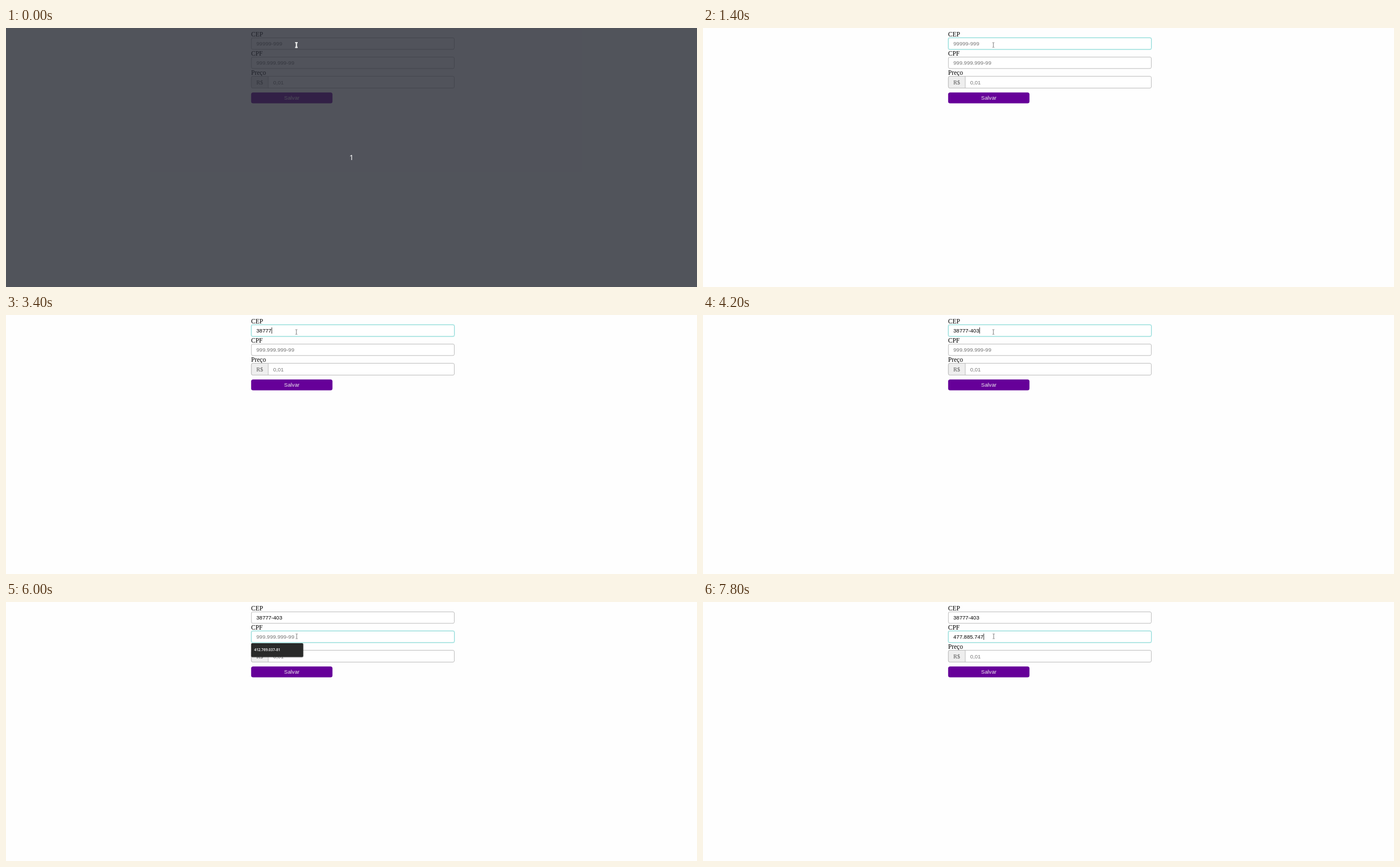
Write an HTML page that moves like this. It is 1220x459 px and loops after 8000 ms.

```html
<!DOCTYPE html>
<html lang="pt-BR">
<head>
<meta charset="utf-8">
<title>Formulário</title>
<style>
  html, body { margin: 0; width: 100%; height: 100%; overflow: hidden; background: #fefefe; }
  svg { display: block; width: 1220px; height: 459px; }
  text { white-space: pre; }
  .label { font: 11.48px "Liberation Serif", serif; fill: #000; }
  .field { font: 9.57px "Liberation Sans", sans-serif; fill: #000; }
  .field.hint { fill: #757575; }
  .prefix { font: 10.05px "Liberation Serif", serif; fill: #555; }
  .save { font: 9.57px "Liberation Sans", sans-serif; fill: #eee; text-anchor: middle; }
  .box { fill: #fff; stroke: #bdbdbd; stroke-width: 1; }
  .box.focus { stroke: #92dcd9; }
  .glow { fill: none; stroke: #a5e4e2; stroke-width: 2.4; opacity: .55; }
  .suggestion { font: 600 6.4px "Noto Sans", sans-serif; fill: #ddd; }
  .count { font: 13px "Noto Sans", sans-serif; fill: #fff; text-anchor: middle; }
</style>
</head>
<body>
<svg viewBox="0 0 1220 459">
  <rect width="1220" height="459" fill="#fefefe"/>

  <text class="label" x="432.8" y="14.8">CEP</text>
  <rect class="glow" id="cepGlow" x="433.3" y="17.5" width="358.2" height="20.3" rx="2.5"/>
  <rect class="box" id="cepBox" x="433.3" y="17.5" width="358.2" height="20.3" rx="2.5"/>
  <text class="field" id="cepText" x="442" y="31.3"></text>

  <text class="label" x="432.8" y="48.8">CPF</text>
  <rect class="glow" id="cpfGlow" x="433.3" y="51.5" width="358.2" height="20.3" rx="2.5"/>
  <rect class="box" id="cpfBox" x="433.3" y="51.5" width="358.2" height="20.3" rx="2.5"/>
  <text class="field" id="cpfText" x="442" y="65.3"></text>

  <text class="label" x="432.8" y="82.7">Preço</text>
  <rect class="box" x="433.3" y="85.6" width="358.2" height="20.9" rx="2.5"/>
  <path d="M463 85.6H435.8a2.5 2.5 0 0 0-2.5 2.5v15.9a2.5 2.5 0 0 0 2.5 2.5H463z" fill="#eee" stroke="#bdbdbd"/>
  <text class="prefix" x="442" y="99.8">R$</text>
  <text class="field hint" x="471.8" y="99.8">0,01</text>

  <rect x="432.8" y="114.2" width="143.6" height="19.2" rx="3.5" fill="#609"/>
  <text class="save" x="504.6" y="127.3">Salvar</text>

  <rect id="caret" width=".8" height="11"/>

  <g id="menu">
    <rect x="432.4" y="73" width="93" height="25.4" rx="2.4" opacity=".25"/>
    <rect x="432.9" y="72.9" width="91.8" height="24.6" rx="2" fill="#292a29"/>
    <text class="suggestion" x="438.3" y="87.3">412.769.037-81</text>
  </g>

  <g id="veil">
    <rect width="1220" height="459" fill="#262932" fill-opacity=".8"/>
    <text class="count" x="610" y="234">1</text>
  </g>

  <g id="pointer" fill="none">
    <path id="beam" d="M-2-4.2H-.6L0-3.7 .6-4.2H2M0-3.7V3.7M-2 4.2H-.6L0 3.7 .6 4.2H2" stroke="#fff" stroke-width="1.8"/>
    <use href="#beam" id="core"/>
    <path d="M-1.7-4.2H-.6L0-3.7 .6-4.2H1.7M0-3.7V3.7M-1.7 4.2H-.6L0 3.7 .6 4.2H1.7" stroke="#555" stroke-width=".75" id="ink"/>
  </g>
</svg>
<script>
const LOOP = 8000;
const $ = id => document.getElementById(id);

// keys: [time, characters shown]; caret: [on, off] spans
const fields = [
  {
    id: "cep", hint: "99999-999", value: "38777-403", top: 22, focus: [800, 5400],
    keys: [[2500, 1], [2700, 2], [2900, 3], [3200, 4], [3400, 5], [3600, 6], [3700, 7], [4000, 8], [4200, 9]],
    caret: [[800, 1400], [2000, 4700], [5200, 5400]]
  },
  {
    id: "cpf", hint: "999.999.999-99", value: "477.885.747", top: 56, focus: [5400, LOOP],
    keys: [[6300, 1], [6500, 2], [6800, 3], [7000, 4], [7100, 5], [7200, 6], [7300, 7], [7600, 10], [7800, 11]],
    caret: [[5400, 6000], [6300, LOOP]]
  }
];

const within = (t, [from, to]) => t >= from && t < to;
const clamp = v => Math.max(0, Math.min(1, v));
const show = (el, on) => el.setAttribute("visibility", on ? "visible" : "hidden");

function drawField(f, t) {
  const text = $(f.id + "Text");
  const count = f.keys.reduce((n, [at, len]) => t >= at ? len : n, 0);
  const focused = within(t, f.focus);
  text.textContent = count ? f.value.slice(0, count) : f.hint;
  text.classList.toggle("hint", !count);
  $(f.id + "Box").classList.toggle("focus", focused);
  show($(f.id + "Glow"), focused);
  if (f.caret.some(span => within(t, span))) {
    const x = 442 + (count ? text.getComputedTextLength() : 0);
    $("caret").setAttribute("x", x + .2);
    $("caret").setAttribute("y", f.top);
    show($("caret"), true);
  }
}

function draw(time) {
  const t = Math.floor(time / 100) * 100; // the picture changes in 100 ms ticks
  show($("caret"), false);
  fields.forEach(f => drawField(f, t));

  const opacity = t < 6000 ? clamp((t - 5300) / 200) : clamp((6700 - t) / 300);
  $("menu").setAttribute("opacity", opacity);

  const veiled = t < 100;
  show($("veil"), veiled);
  $("ink").setAttribute("stroke-opacity", veiled ? .25 : 1);

  const move = clamp((t - 4900) / 400);
  $("pointer").setAttribute("transform", `translate(${512.7 + .5 * move} ${30.1 + 30.7 * move})`);
}

const start = performance.now();
function tick() {
  draw((performance.now() - start) % LOOP);
  requestAnimationFrame(tick);
}
tick();
</script>
</body>
</html>
```
